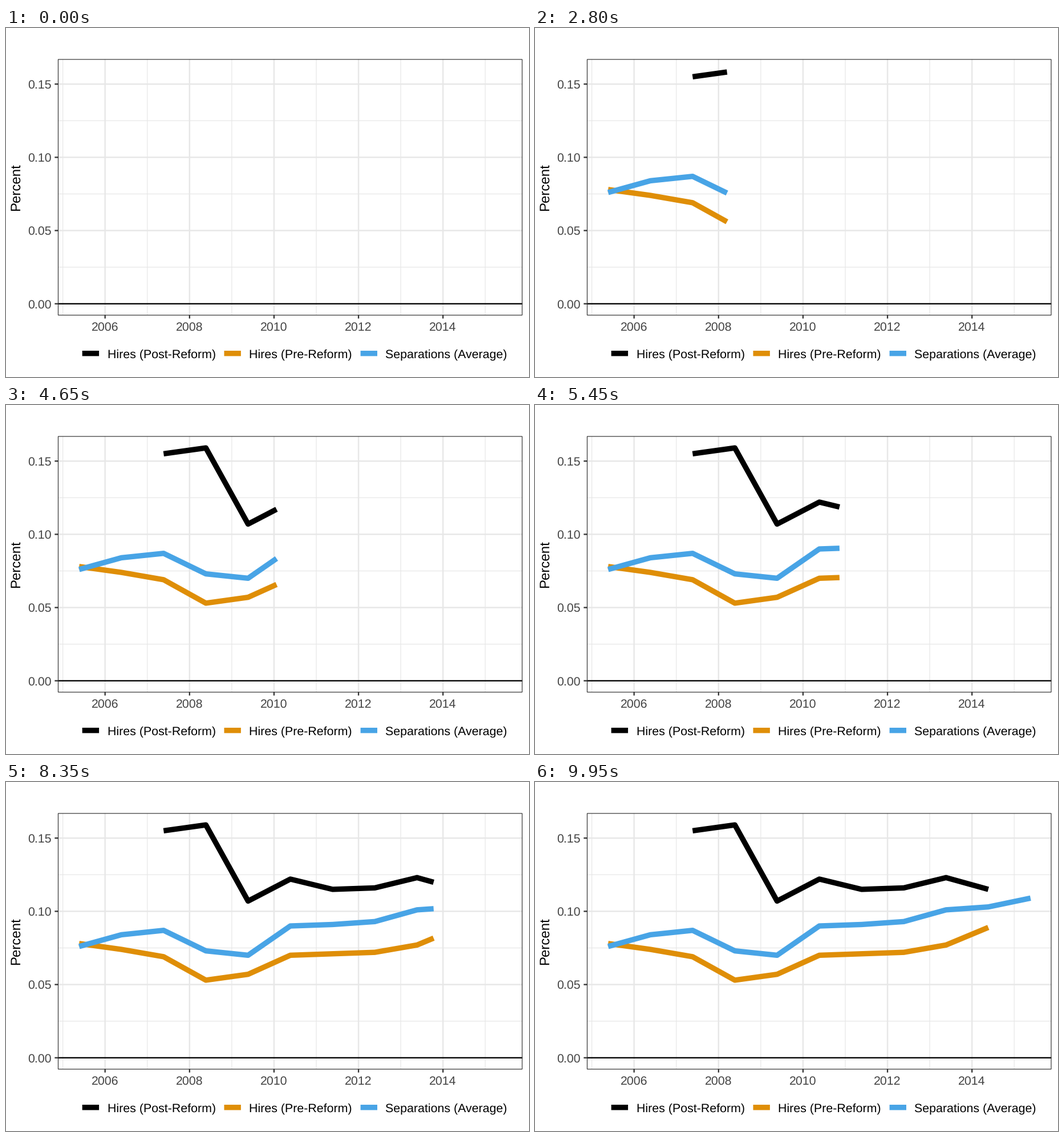
Animation of 917 by 611 pixels, one loop 10000 ms. Source, as a matplotlib script:

```python
import numpy as np
import matplotlib.pyplot as plt
from matplotlib.animation import FuncAnimation
from matplotlib.patches import Rectangle

W, H, DPI = 917, 611, 64
FRAMES, INTERVAL = 200, 50
PT = 72 / DPI  # points per pixel

BLACK, ORANGE, BLUE = "#000000", "#DF8E07", "#48A4E6"
GRID, FRAME, LABEL = "#E7E7E7", "#333333", "#444444"
LEFT, RIGHT, TOP, BOTTOM = 91.2, 905.3, 54.7, 503.0
LINE_W = 9.4
START = 2005.386
SPAN = 10  # years revealed in one loop

plt.rcParams.update({
    "font.family": "Liberation Sans",
    "text.hinting": "none",
    "path.snap": False,
})

# label, colour, first year offset, last visible offset, yearly values
SERIES = [
    ("Hires (Post-Reform)", BLACK, 2, 9,
     [.155, .159, .107, .122, .115, .116, .123, .115, .130]),
    ("Hires (Pre-Reform)", ORANGE, 0, 9,
     [.078, .074, .069, .053, .057, .070, .071, .072, .077, .089, .080]),
    ("Separations (Average)", BLUE, 0, 10,
     [.076, .084, .087, .073, .070, .090, .091, .093, .101, .103, .109]),
]


def year_x(year):
    return 173.7 + (year - 2006) * 74.06


def value_y(value):
    return 482.8 - value * 2564


fig = plt.figure(figsize=(W / DPI, H / DPI), dpi=DPI, facecolor="white")
ax = fig.add_axes([0, 0, 1, 1])
ax.set_xlim(0, W)
ax.set_ylim(H, 0)
ax.axis("off")


def stroke(xs, ys, color, width, z):
    line, = ax.plot(xs, ys, color=color, lw=width * PT, zorder=z,
                    solid_capstyle="butt", solid_joinstyle="round")
    return line


def label(x, y, text, size=21.33, color=LABEL, **kw):
    ax.text(x, y, text, fontsize=size * PT, color=color,
            va=kw.pop("va", "baseline"), **kw)


def draw_panel():
    for year in range(2005, 2016):
        x = year_x(year)
        major = year % 2 == 0
        stroke([x, x], [TOP, BOTTOM], GRID, 2.4 if major else 1.2, 2 if major else 1)
        if major:
            stroke([x, x], [BOTTOM, BOTTOM + 5.6], FRAME, 2.3, 2)
            label(x, 529.6, str(year), ha="center")
    for step in range(1, 7):
        y = value_y(step * .025)
        major = step % 2 == 0
        stroke([LEFT, RIGHT], [y, y], GRID, 2.4 if major else 1.2, 2 if major else 1)
    for value in (0, .05, .10, .15):
        y = value_y(value)
        stroke([LEFT - 5.8, LEFT], [y, y], FRAME, 2.3, 2)
        label(80, y + 7.6, f"{value:.2f}", ha="right")
    y = value_y(0)
    stroke([LEFT, RIGHT], [y, y], BLACK, 2.3, 3)
    ax.add_patch(Rectangle((LEFT + .3, TOP + .3), RIGHT - LEFT - .6, BOTTOM - TOP - .6,
                           fill=False, ec=FRAME, lw=1.2 * PT, zorder=8))
    label(28.5, 279, "Percent", 24, BLACK, rotation=90,
          ha="right", va="center", rotation_mode="default")


def draw_legend():
    for (name, color, *_), x in zip(SERIES, (133.7, 382.5, 621.6)):
        stroke([x, x + 29.4], [569.7, 569.7], color, LINE_W, 5)
        label(x + 43.8, 577.4, name, color=BLACK, ha="left")


draw_panel()
draw_legend()
lines = [stroke([], [], color, LINE_W, 5 + i * .1)
         for i, (_, color, *_) in enumerate(SERIES)]


def update(frame):
    now = SPAN * frame / (FRAMES - 1)
    for line, (_, _, first, last, values) in zip(lines, SERIES):
        # the two shorter lines drop their extension once the reveal is done
        tip = last if frame == FRAMES - 1 else now
        if tip <= first:
            line.set_data([], [])
            continue
        years = first + np.arange(len(values))
        t = np.append(years[years < tip], tip)
        line.set_data(year_x(START + t), value_y(np.interp(t, years, values)))
    return lines


anim = FuncAnimation(fig, update, frames=FRAMES, interval=INTERVAL,
                     init_func=lambda: update(0), repeat=True, repeat_delay=0)
plt.show()
```
